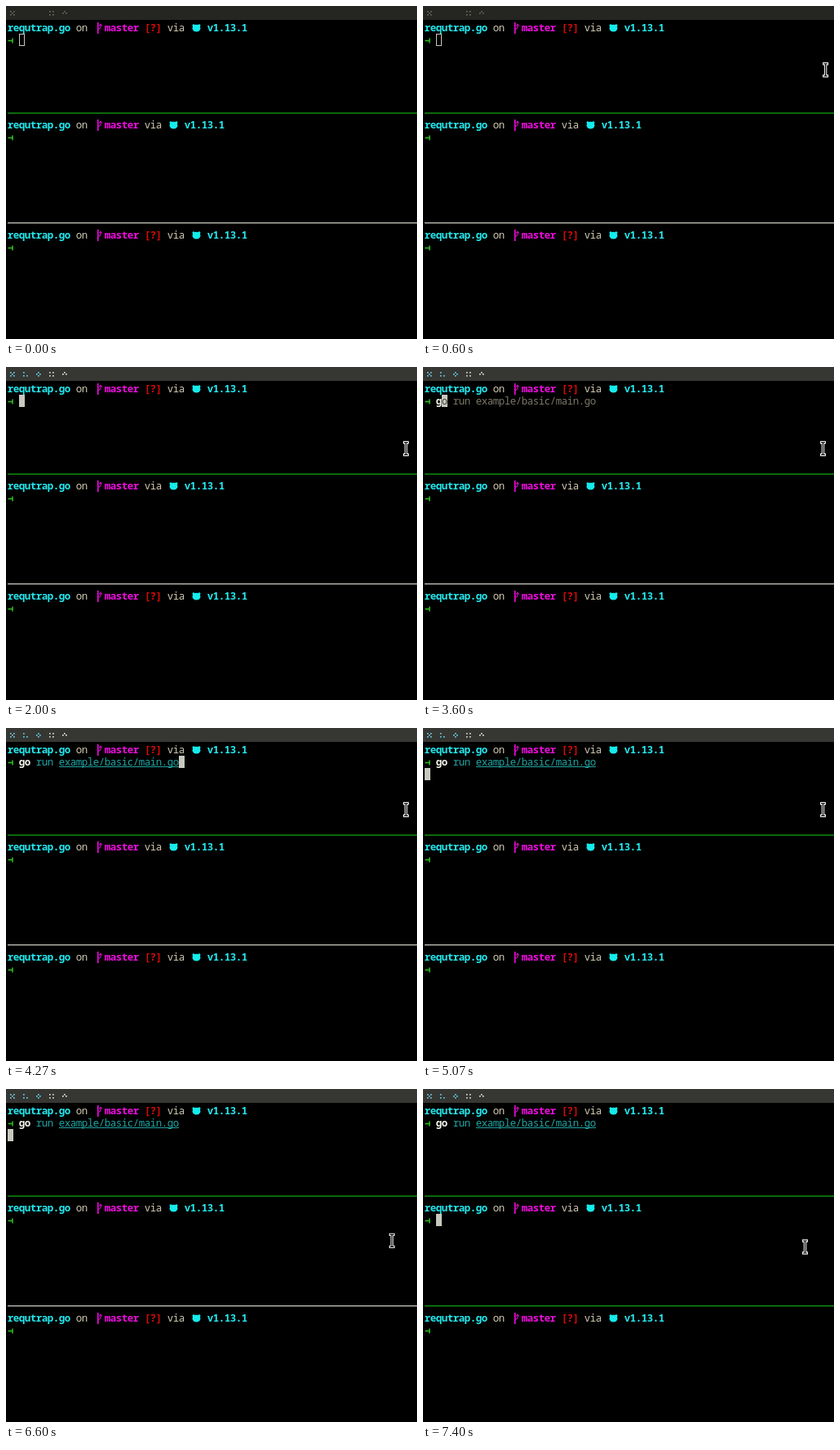
These frames come from a looping animation (504 px wide and 408 px high, 8 s). An HTML page with a canvas:

```html
<!DOCTYPE html>
<html lang="en">
<head>
<meta charset="utf-8">
<title>Terminal panes</title>
<style>
  html, body { margin: 0; width: 100%; height: 100%; overflow: hidden; background: #000; }
  canvas { display: block; }
</style>
</head>
<body>
<canvas id="stage" width="504" height="408"></canvas>
<script>
const ctx = document.getElementById('stage').getContext('2d');
const LOOP = 8000, COL = 7, ROW = 15;
const FONT = '12.5px "Noto Sans Mono", "DejaVu Sans Mono", monospace';
const PANES = [20, 139, 274];            // top of each pane's first row
const CYAN = '#22e8ee', SAND = '#d2cbb2', PINK = '#f00ce0', RED = '#d80a0a',
      LEAF = '#2fc41c', WHITE = '#f4f4ec', TEAL = '#1fa6a4', BLOCK = '#c9c8be',
      GREEN = '#108a10';
const ICONS = [                          // 3 x 3 dot patterns
  ['101010101', '#6cc8dc'], ['100000101', '#5fcade'], ['010101010', '#5fcade'],
  ['101000101', '#d4d4cc'], ['010101000', '#deded6']
];

// moments of the story
const FOCUS = 1200, TYPE = 3270, HINT = 3330, ACCEPT = 3930, ENTER = 4930, SWITCH = 7070;

// pointer track: time, x, y
const TRACK = [
  [70, 498, 12], [400, 496, 62], [870, 490.5, 100], [5930, 490.5, 100],
  [6070, 490.5, 106], [6330, 486, 150], [6670, 470, 195], [6870, 470, 195], [6930, 468.5, 193.5]
];

function rect(x, y, w, h, color) {
  ctx.fillStyle = color;
  ctx.fillRect(x, y, w, h);
}

function line(color, width, ...paths) {
  ctx.strokeStyle = color;
  ctx.lineWidth = width;
  ctx.beginPath();
  for (const [x, y, ...rest] of paths) {
    ctx.moveTo(x, y);
    for (let i = 0; i < rest.length; i += 2) ctx.lineTo(rest[i], rest[i + 1]);
  }
  ctx.stroke();
}

function disc(x, y, rx, ry, color) {
  ctx.fillStyle = color;
  ctx.beginPath();
  ctx.ellipse(x, y, rx, ry, 0, 0, 7);
  ctx.fill();
}

const colX = col => 2 + col * COL;

// one glyph per terminal cell
function text(str, col, top, color, bold) {
  ctx.font = (bold ? 'bold ' : '') + FONT;
  ctx.textAlign = 'center';
  ctx.fillStyle = color;
  [...str].forEach((ch, i) => ctx.fillText(ch, colX(col + i + .5), top + 11));
}

function hamster(x, y) {
  disc(x - 3.4, y - 3.4, 1.6, 1.6, '#14ecec');
  disc(x + 3.4, y - 3.4, 1.6, 1.6, '#14ecec');
  disc(x, y, 4.9, 4.4, '#14ecec');
}

function prompt(top, dirty) {
  text('requtrap.go', 0, top, CYAN, true);
  text('on', 12, top, SAND);
  line(PINK, 1.6, [112.8, top, 112.8, top + 14]);
  line('#c408b4', 1.2, [113, top + 9, 116, top + 6.5, 116, top + 2.5], [114.3, top + 4.5, 116, top + 2.2, 117.7, top + 4.5]);
  text('master', 17, top, PINK, true);
  if (dirty) text('[?]', 24, top, RED, true);
  const col = dirty ? 28 : 24;
  text('via', col, top, SAND);
  hamster(colX(col + 5) + .5, top + 7.2);
  text('v1.13.1', col + 7, top, CYAN, true);
  line(LEAF, 1.5, [2.5, top + 22.5, 8, top + 22.5], [8, top + 19.5, 8, top + 25.5]);
}

function cursor(col, row, top) {
  rect(colX(col), top - 1 + row * ROW, COL, ROW, BLOCK);
}

function titleBar(focused) {
  rect(0, 0, 504, 17, focused ? '#363633' : '#252522');
  ICONS.forEach(([dots, color], i) => {
    if (!focused && (i === 1 || i === 2)) return;
    [...dots].forEach((dot, k) => {
      if (+dot) rect(5 + i * 16 + k % 3 * 2, 6 + (k / 3 | 0) * 2, 1.7, 1.7, focused ? color : '#666658');
    });
  });
}

function command(t) {
  const top = PANES[0], row = top + ROW;
  if (t < FOCUS) {
    ctx.strokeStyle = BLOCK;
    ctx.lineWidth = 1;
    ctx.strokeRect(16.5, row - .5, 6, 14);
  } else if (t < TYPE) {
    cursor(2, 1, top);
  } else if (t < ACCEPT) {
    text('g', 2, row, WHITE, true);
    cursor(3, 1, top);
    if (t >= HINT) {
      text('o', 3, row, '#444440');
      text('run example/basic/main.go', 5, row, '#7c7868');
    }
  } else {
    text('go', 2, row, WHITE, true);
    text('run', 5, row, TEAL);
    text('example/basic/main.go', 9, row, TEAL);
    rect(colX(9), row + 12, 21 * COL, 1, TEAL);
    if (t < ENTER) cursor(30, 1, top);
    else if (t < SWITCH) cursor(0, 2, top);
  }
}

function pointer(t) {
  if (t < TRACK[0][0]) return;
  let [, x, y] = TRACK[TRACK.length - 1];
  const i = TRACK.findIndex(p => p[0] > t);
  if (i > 0) {
    const [t0, x0, y0] = TRACK[i - 1], [t1, x1, y1] = TRACK[i];
    const k = (t - t0) / (t1 - t0);
    x = x0 + (x1 - x0) * k;
    y = y0 + (y1 - y0) * k;
  }
  const beam = (color, width, grow) => line(color, width,
    [x - 2 - grow, y - 7.5, x + 2 + grow, y - 7.5],
    [x, y - 7.5, x, y + 7.5],
    [x - 2 - grow, y + 7.5, x + 2 + grow, y + 7.5]);
  beam('#eeeef2', 3.4, 1.5);
  beam('#000', 1.2, .4);
}

function draw(t) {
  rect(0, 0, 504, 408, '#000');
  titleBar(t >= FOCUS);
  rect(2, 130.5, 502, 1.5, GREEN);
  rect(2, 265, 502, 1.5, t < SWITCH ? '#b0aea6' : GREEN);
  PANES.forEach((top, i) => prompt(top, i !== 1));
  command(t);
  if (t >= SWITCH) cursor(2, 1, PANES[1]);
  pointer(t);
}

const start = performance.now();
function tick() {
  draw((performance.now() - start) % LOOP);
  requestAnimationFrame(tick);
}
tick();
</script>
</body>
</html>
```
